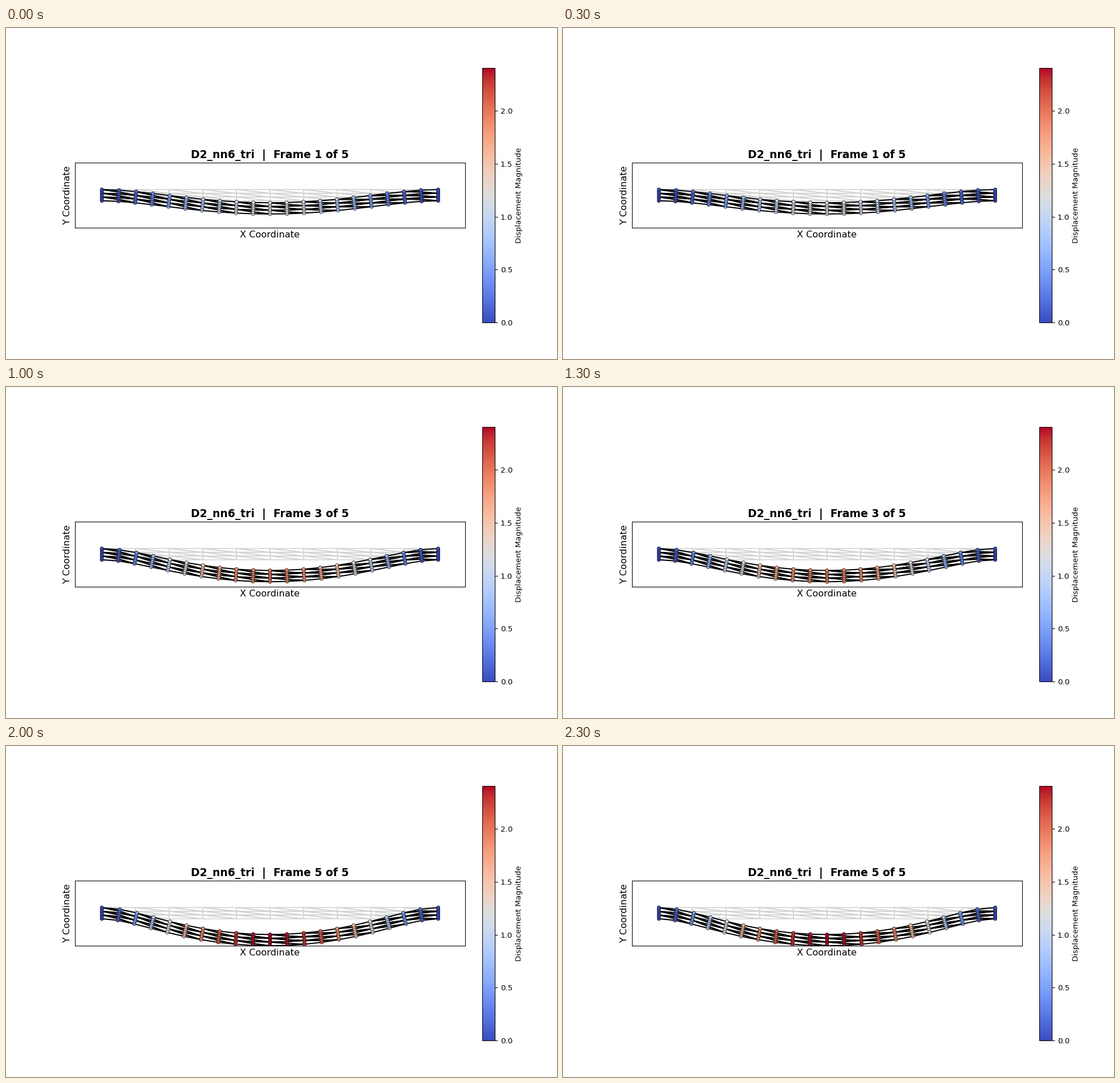
A matplotlib script that plays this animation: 966 by 580 pixels, repeating every 2500 ms.

```python
import numpy as np
import matplotlib.pyplot as plt
from matplotlib.animation import FuncAnimation
from matplotlib.collections import LineCollection

DPI = 96.6
LENGTH, HEIGHT = 30.0, 1.0
NX, NY = 21, 7              # nodes per direction, midside nodes included
FINE = 30                   # integration steps between node columns
SAGS = [1.18, 1.645, 1.96, 2.204, 2.408]
PEAK = SAGS[-1]

gx, gy = np.meshgrid(np.linspace(0, LENGTH, NX), np.linspace(0, HEIGHT, NY))
rest = np.column_stack([gx.ravel(), gy.ravel()])


def node(i, j):
    return j * NX + i


def build_triangles():
    """Closed outlines of the six-node triangles: corner, midside, corner..."""
    rings = []
    for j in range(0, NY - 1, 2):
        for i in range(0, NX - 1, 2):
            ll, lr = (i, j), (i + 2, j)
            ul, ur = (i, j + 2), (i + 2, j + 2)
            for corners in ((ll, lr, ul), (lr, ur, ul)):
                ring = []
                for a, b in zip(corners, corners[1:] + corners[:1]):
                    ring += [node(*a), node((a[0] + b[0]) // 2, (a[1] + b[1]) // 2)]
                rings.append(ring + ring[:1])
    return np.array(rings)


def deform(sag):
    """Clamped beam under uniform load, stiffened by its own axial tension."""
    k = 5.4 * sag / HEIGHT
    t = np.linspace(0, 1, (NX - 1) * FINE + 1)
    x = t * LENGTH
    w = t * (1 - t) - (np.cosh(k / 2) - np.cosh(k * (t - 0.5))) / (k * np.sinh(k / 2))
    w *= sag / w.max()
    slope = np.gradient(w, x)
    stretch = slope ** 2 / 2
    pulled = np.concatenate([[0], np.cumsum((stretch[1:] + stretch[:-1]) / 2) * x[1]])
    u = t * pulled[-1] - pulled
    angle = np.arctan(slope)
    angle[[0, -1]] = 0
    w, u, angle = w[::FINE], u[::FINE], angle[::FINE]
    arm = gy - HEIGHT / 2
    dx = u + arm * np.sin(angle)
    dy = -w + arm * (np.cos(angle) - 1)
    return np.column_stack([dx.ravel(), dy.ravel()])


triangles = build_triangles()

fig, ax = plt.subplots(figsize=(966.001 / DPI, 580.001 / DPI), dpi=DPI)
ax.set_aspect("equal")
ax.set_xlim(-PEAK, LENGTH + PEAK)
ax.set_ylim(-PEAK, HEIGHT + PEAK)
ax.set_xticks([])
ax.set_yticks([])
ax.set_xlabel("X Coordinate", fontsize=12)
ax.set_ylabel("Y Coordinate", fontsize=12)
title = ax.set_title("", fontsize=14, fontweight="bold")

ax.add_collection(LineCollection(rest[triangles], colors="lightgray",
                                 linewidths=1.2, zorder=1), autolim=False)
mesh = LineCollection(rest[triangles], colors="black", linewidths=1.5, zorder=2)
ax.add_collection(mesh, autolim=False)
dots = ax.scatter(rest[:, 0], rest[:, 1], c=np.zeros(len(rest)), s=20,
                  cmap="coolwarm", vmin=0, vmax=PEAK,
                  edgecolors="black", linewidths=0.5, zorder=3)
bar = fig.colorbar(dots, ax=ax, fraction=0.046, pad=0.04)
bar.set_label("Displacement Magnitude")


def update(step):
    shift = deform(SAGS[step])
    points = rest + shift
    mesh.set_segments(points[triangles])
    dots.set_offsets(points)
    dots.set_array(np.hypot(shift[:, 0], shift[:, 1]))
    title.set_text(f"D2_nn6_tri  |  Frame {step + 1} of {len(SAGS)}")
    return mesh, dots, title


anim = FuncAnimation(fig, update, frames=len(SAGS), interval=500,
                     repeat=True, repeat_delay=0)
plt.show()
```
